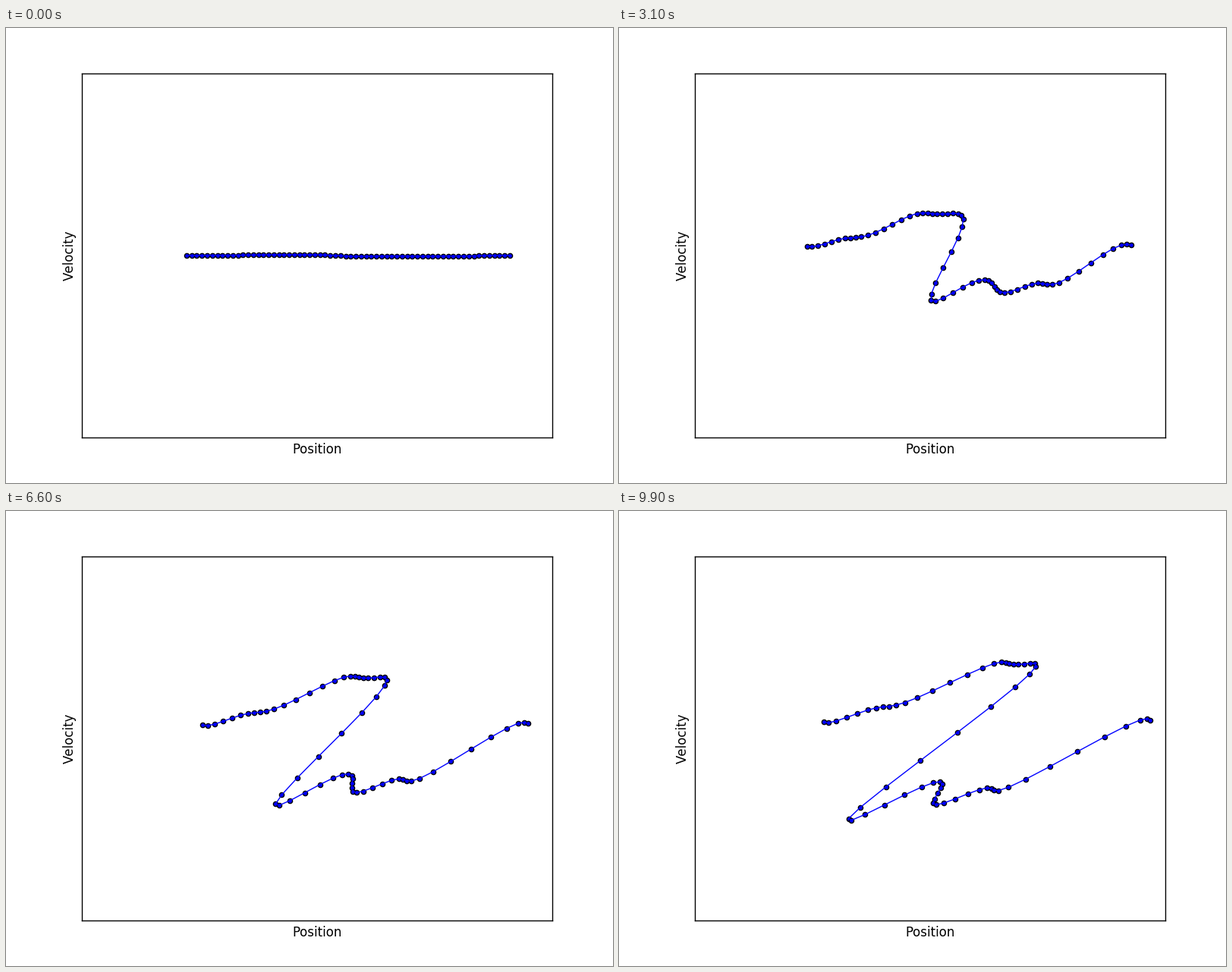
Write a matplotlib script that moves like this. It is 800x600 px and loops after 10 s.

```python
import numpy as np
import matplotlib.pyplot as plt
from matplotlib.animation import FuncAnimation

plt.rcParams.update({
    "font.family": "DejaVu Sans",
    "font.size": 12,
    "text.kerning_factor": 6,
    "axes.linewidth": 1.0,
})

FRAMES = 100
PARTICLES = 64
MODES = 10
START = 0.01      # growth factor of the first frame, in frame units
RATIO = 1.5       # final displacement over final velocity

# Final displacement in pixels at every third particle
KEYS = [31.2, 41.8, 60.4, 66.1, 94.1, 140.1, 150.3, 146.4, 148.0, 101.7, -43.7,
        -158.3, -131.5, -87.4, -97.8, -127.9, -119.6, -97.6, -103.1, -55.3,
        24.3, 37.3]


def waves(index):
    """Periodic basis: a constant plus sines and cosines of each mode."""
    phase = 2 * np.pi * np.outer(index, np.arange(1, MODES + 1)) / PARTICLES
    return np.hstack([np.ones((len(index), 1)), np.cos(phase), np.sin(phase)])


particle = np.arange(PARTICLES)
weights = np.linalg.lstsq(waves(particle[::3]), KEYS, rcond=None)[0]
shift = waves(particle) @ weights
rest = 237.95 + 6.76 * particle


def phase_space(i):
    """Linear growth: position scales with a, velocity with sqrt(a)."""
    a = (i + START) / (FRAMES - 1 + START)
    return rest + a * shift, 300 - np.sqrt(a) * shift / RATIO


fig = plt.figure(figsize=(8, 6), dpi=100, facecolor="white")
ax = fig.add_axes([0.125, 0.1, 0.775, 0.8])
x, v = phase_space(0)
dots = ax.scatter(x, v, s=20, c="#0000ff", edgecolors="black",
                  linewidths=1.0, zorder=1)
line, = ax.plot(x, v, color="#0000ff", lw=1.0, zorder=2)
ax.set(xlim=(100, 720), ylim=(540, 60), xticks=[], yticks=[])
ax.set_xlabel("Position", labelpad=5)
ax.set_ylabel("Velocity", labelpad=5)


def update(i):
    x, v = phase_space(i)
    dots.set_offsets(np.column_stack([x, v]))
    line.set_data(x, v)
    return dots, line


anim = FuncAnimation(fig, update, frames=FRAMES, interval=100,
                     repeat=True, repeat_delay=0)
plt.show()
```
